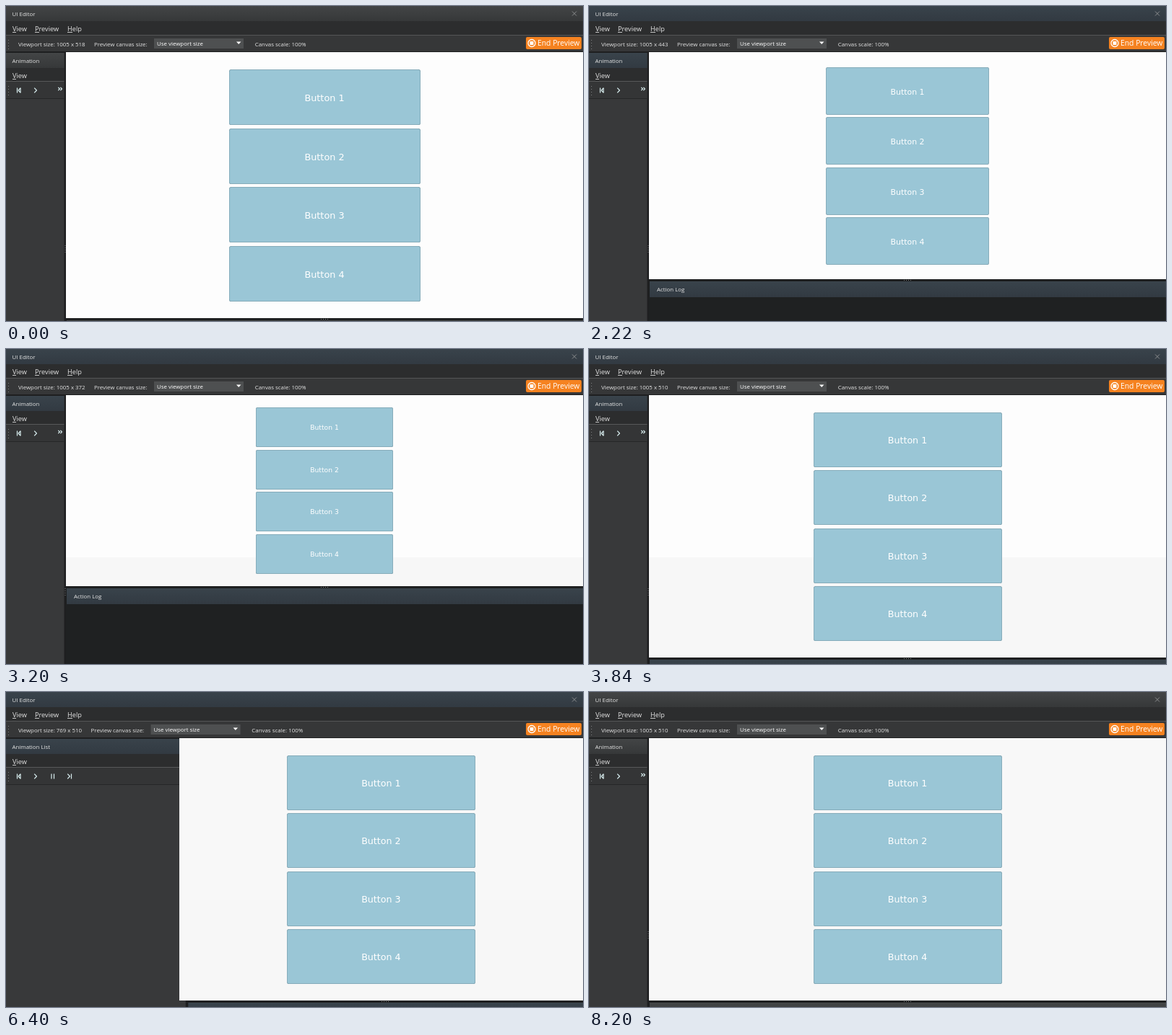
Recreate the animation shown at these times as an HTML page with a canvas. Size 799 by 437 pixels, loop 8220 ms.

```html
<!DOCTYPE html>
<html lang="en">
<head>
<meta charset="utf-8">
<title>UI Editor preview</title>
<style>
html, body { margin: 0; width: 100%; height: 100%; overflow: hidden; background: #202122; }
canvas { display: block; }
</style>
</head>
<body>
<canvas id="stage" width="799" height="437"></canvas>
<script>
const ctx = document.getElementById('stage').getContext('2d');
const W = 799, H = 437, LOOP = 8220, TOP = 64, LEFT = 83;
const UNIT = 1005 / (W - LEFT);
const LAG = 32; // the dock repaints a little after the preview
const UI = '"Open Sans", "Noto Sans", sans-serif';
const GAME = '"DejaVu Sans", sans-serif';
const DARK = '#1e1f20', PANEL = '#38393a', MENU = '#2c2d2e', INK = '#e4e4e4', ICON = '#d9eef0';

const drag = p => 0.45 * p + 0.55 * (0.5 - 0.5 * Math.cos(Math.PI * p));
const release = p => 1 - (1 - p) ** 1.5;
const ramp = (t, from, to, ease) => ease(Math.min(1, Math.max(0, (t - from) / (to - from))));

// Splitter positions
const bottomAt = t => 433.2 - 144.6 * ramp(t, 1940, 2640, drag) + 139 * ramp(t, 2880, 3840, drag);
const leftAt = t => LEFT + 179 * (ramp(t, 5150, 6160, drag) - ramp(t, 6340, 7060, release));

function box(x, y, w, h, fill) {
  ctx.fillStyle = fill;
  ctx.fillRect(x, y, w, h);
}

function roundBox(x, y, w, h, r, fill) {
  ctx.fillStyle = fill;
  ctx.beginPath();
  ctx.roundRect(x, y, w, h, r);
  ctx.fill();
}

function text(str, x, y, size = 7.9, fill = INK, font = UI) {
  ctx.font = size + 'px ' + font;
  ctx.fillStyle = fill;
  ctx.fillText(str, x, y);
}

function line(x0, y0, x1, y1, color = ICON, width = 1.2) {
  ctx.strokeStyle = color;
  ctx.lineWidth = width;
  ctx.beginPath();
  ctx.moveTo(x0, y0);
  ctx.lineTo(x1, y1);
  ctx.stroke();
}

const bar = (x, y) => line(x, y - 3.5, x, y + 3.5);

// Arrowhead with its tip at x, r tall each way; a negative r points left
function chevron(x, y, r) {
  line(x - r, y - r, x, y);
  line(x, y, x - r, y + r);
}

function dots(x, y, n, dx, dy) {
  for (let i = 0; i < n; i++) box(x + i * dx, y + i * dy, 1, 1, '#7d7f80');
}

function titleBar(str, x, y, h, right, blue) {
  const g = ctx.createLinearGradient(0, y, 0, y + h);
  g.addColorStop(0, blue ? '#39434b' : '#434546');
  g.addColorStop(1, blue ? '#323a42' : '#363839');
  box(x, y, right - x, h, g);
  text(str, x + (x ? 10 : 8.5), y + 13.6);
}

function menuItem(str, x, y) {
  text(str, x, y, 9.2);
  box(x, y + 1, Math.round(ctx.measureText(str[0]).width), 1, '#c4c4c4');
}

function header(width, height, blue) {
  titleBar('UI Editor', 0, 0, 21, W, blue);
  line(784, 7.5, 790, 13.5, '#8b8d8e', 1);
  line(790, 7.5, 784, 13.5, '#8b8d8e', 1);
  box(0, 21, W, 20, MENU);
  menuItem('View', 9, 35);
  menuItem('Preview', 40, 35);
  menuItem('Help', 85, 35);
  box(0, 40, W, 1, '#545657');
  box(0, 41, W, 22, '#363738');
  box(0, 63, W, 1, DARK);
  dots(3, 47, 4, 0, 4);

  const dx = width < 1000 ? -4.4 : 0; // one digit less in the label
  text(`Viewport size: ${width} x ${height}`, 17, 55.5);
  text('Preview canvas size:', 122 + dx, 55.5);
  box(205 + dx, 45, 124, 14, '#4e5051');
  text('Use viewport size', 209 + dx, 55, 7.9, '#fff');
  ctx.fillStyle = '#fff';
  ctx.beginPath();
  ctx.moveTo(319 + dx, 49.5);
  ctx.lineTo(325.5 + dx, 49.5);
  ctx.lineTo(322.2 + dx, 53);
  ctx.fill();
  text('Canvas scale: 100%', 344.7 + dx, 55.5);

  roundBox(720, 43, 77, 17, 2, '#f58220');
  ctx.strokeStyle = '#fff';
  ctx.lineWidth = 1.3;
  ctx.beginPath();
  ctx.arc(728, 51.5, 5, 0, Math.PI * 2);
  ctx.stroke();
  box(725.5, 49, 5, 5, '#fff');
  text('End Preview', 736, 55.3, 10.35, '#fff');
}

function dock(left, blue) {
  const w = left - 2.5, y = 117;
  box(0, 65, w, H - 65, PANEL);
  titleBar(w > 90 ? 'Animation List' : 'Animation', 0, 65, 21, w, blue);
  box(0, 86, w, 18, MENU);
  menuItem('View', 9, 100);
  box(0, 104, w, 1, '#58595a');
  box(0, 105, w, 23, '#343536');
  box(0, 128, w, 1, '#262728');
  dots(3, 111, 4, 0, 4);

  // Buttons that do not fit fold into a double chevron
  const icons = [
    () => { bar(15.5, y); bar(20, y); chevron(17, y, -3); },
    () => chevron(42.5, y, 3.3),
    () => { bar(63, y); bar(66.5, y); },
    () => { chevron(88.5, y, 3.3); bar(90.5, y); }
  ];
  const fit = w > 99 ? 4 : w > 88 ? 3 : 2;
  icons.slice(0, fit).forEach(icon => icon());
  if (fit < 4) {
    chevron(w - 6, 115, 2.2);
    chevron(w - 3, 115, 2.2);
  }
  dots(left - 1.5, 332, 4, 0, 3);
}

function actionLog(left, bottom, blue) {
  titleBar('Action Log', left + 1, bottom + 3, 22, W, blue);
  box(left, bottom + 25, W - left, H, '#1f2122');
  dots(Math.round((left + W) / 2) - 5, bottom + 1, 4, 3, 0);
}

function preview(left, edge, bottom, t) {
  const h = bottom - TOP, mid = (left + W) / 2;
  box(edge, TOP, W - edge, h, t < 5140 ? '#fdfdfd' : '#f8f8f8');
  if (t > 2880) box(edge, 289, W - edge, Math.max(0, bottom - 289), '#f7f7f7');

  const bw = Math.round(h * 0.718), bh = Math.round(h * 0.2085);
  const x = Math.round(mid - bw / 2), size = h * 0.0347, r = h * 0.007;
  ctx.textAlign = 'center';
  for (let i = 0; i < 4; i++) {
    const y = Math.round(TOP + h * (0.0655 + 0.221 * i));
    roundBox(x, y, bw, bh, r, '#7fa3b0');
    roundBox(x + 0.7, y + 0.7, bw - 1.4, bh - 1.4, r, '#9ac6d6');
    text('Button ' + (i + 1), mid, y + bh / 2 + size * 0.42, size, '#fff', GAME);
  }
  ctx.textAlign = 'left';
}

function draw(t) {
  const blue = t >= 1840 && t < 8200;
  const bottom = bottomAt(t), left = leftAt(t), docked = leftAt(t - LAG);
  const width = Math.round((W - docked) * UNIT);
  const height = Math.round((bottom - TOP) * UNIT);
  box(0, 0, W, H, DARK);
  dock(docked, blue);
  actionLog(docked, Math.round(bottom), blue);
  preview(left, Math.round(Math.min(left, docked)), Math.round(bottom), t);
  header(width, height, blue);
}

const start = performance.now();
function tick() {
  draw((performance.now() - start) % LOOP);
  requestAnimationFrame(tick);
}
tick();
</script>
</body>
</html>
```
